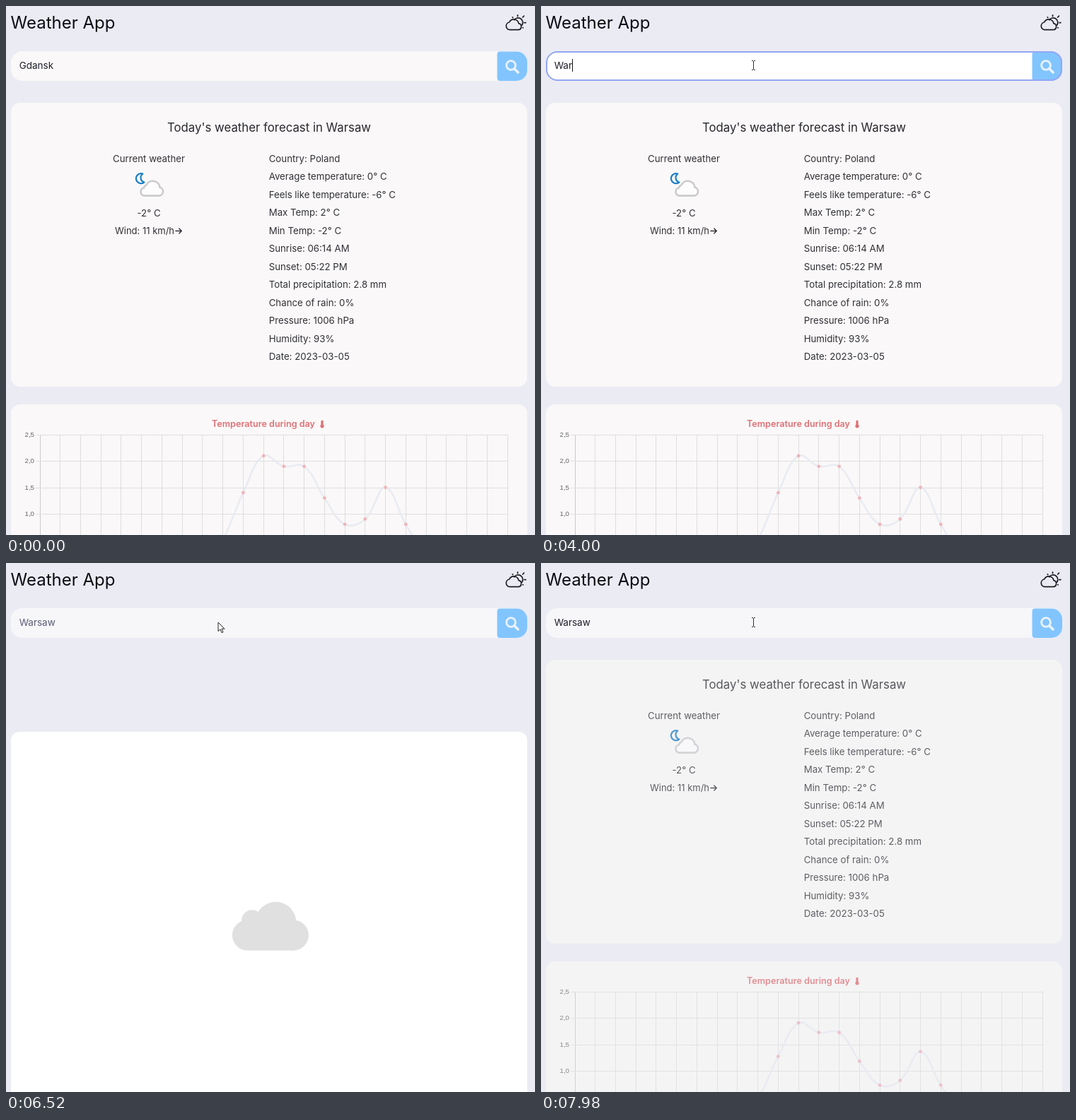
An HTML page for the animation above (8000 ms loop, 748x749 px).

```html
<!DOCTYPE html>
<html lang="en">
<head>
<meta charset="utf-8">
<title>Weather App</title>
<style>
  html, body { margin: 0; width: 100%; height: 100%; overflow: hidden; background: #ebebf4; }
  svg { display: block; width: 748px; height: 749px; font-family: Inter, "Open Sans", sans-serif; }
  .info { font-size: 13.25px; fill: #303036; }
  .axis { font: 9.7px "Liberation Sans", Arial, sans-serif; fill: #666; text-anchor: end; }
  .mid { text-anchor: middle; }
  .line { fill: none; stroke-linecap: round; stroke-linejoin: round; }
</style>
</head>
<body>
<svg viewBox="0 0 748 749">
  <rect width="748" height="749" fill="#ebebf4"/>
  <text x="6.5" y="32" font-size="24" fill="#0b0b10">Weather App</text>
  <g class="line" stroke="#1c1c20" stroke-width="1.7">
    <path d="M712.3 33.7h12a4.6 4.6 0 0 0 .6-9.1 7 7 0 0 0-13.2-1.6a5.4 5.4 0 0 0 .6 10.7z"/>
    <path d="M718.8 19.8a6.4 6.4 0 0 1 10.9 7.2"/>
    <path d="M723.5 12.8v1.8M716.2 15.9l.5.5M730.6 16l1.8-1.8M733 23.6h1.9M730.7 30.6l.4.4"/>
  </g>

  <rect id="field" x="7" y="64" width="730" height="42" rx="16"/>
  <path d="M698.5 64.5H722a15 15 0 0 1 15 15V91a15 15 0 0 1-15 15H698.5a4 4 0 0 1-4-4V68.5a4 4 0 0 1 4-4z" fill="#82c5fe"/>
  <rect id="ring" x="8" y="65" width="728" height="40" rx="15" fill="none" stroke="#93a5f6" stroke-width="2"/>
  <g class="line" stroke="#e9f2fb">
    <circle cx="714" cy="84" r="6.4" stroke-width="2.9"/>
    <path d="M719 89l5 5" stroke-width="3.6"/>
  </g>
  <text id="query" x="18.7" y="88.5" font-size="13.5"></text>
  <rect id="caret" y="75" width="1" height="18" fill="#111"/>

  <g id="content">
    <g id="cards">
      <rect x="7" y="137" width="730" height="402" rx="13"/>
      <rect x="7" y="564" width="730" height="230" rx="13"/>
    </g>
    <text class="mid" x="372" y="178" font-size="16.8" fill="#28282e">Today's weather forecast in Warsaw</text>
    <g class="info mid">
      <text x="202" y="221">Current weather</text>
      <text x="202" y="297.5">-2° C</text>
      <text x="196" y="323" font-size="13">Wind: 11 km/h</text>
    </g>
    <path class="line" d="M240 318.5h8.2M244.8 315l3.5 3.5-3.5 3.5" stroke="#303036" stroke-width="1.4"/>
    <path class="line" d="M193.3 237.6A7 7 0 1 0 195.4 249.6A6.8 6.8 0 0 1 193.3 237.6Z" stroke="#1c7fc6" stroke-width="2.2"/>
    <path d="M195.5 268.6H216.5A6 6 0 0 0 217.5 256.8A10 10 0 0 0 198.5 253.5A5 5 0 0 0 195 257.4A5.7 5.7 0 0 0 195.5 268.6Z" fill="#fdfdfd" stroke="#cbcbcd" stroke-width="2.6"/>
    <g id="facts" class="info"></g>

    <text x="291" y="595.5" font-size="12.6" font-weight="600" fill="#e07075">Temperature during day</text>
    <g fill="#e07075">
      <rect x="445.4" y="586.5" width="3.2" height="9" rx="1.6"/>
      <circle cx="447" cy="594.8" r="2.6"/>
    </g>
    <g id="grid"></g>
    <path id="curve" class="line" stroke="#e8ebf2" stroke-width="2.4"/>
    <g id="dots" fill="#eeb4bb"></g>
  </g>

  <g id="loader">
    <rect x="7" y="239" width="730" height="530" rx="12" fill="#fff"/>
    <g id="cloud" fill="#e0e0e0">
      <circle cx="341.5" cy="527" r="21.6"/>
      <circle cx="406.3" cy="527" r="21.6"/>
      <circle cx="381.5" cy="508.3" r="28.6"/>
      <circle cx="348" cy="506" r="14.8"/>
      <rect x="341.5" y="508" width="65" height="40.6"/>
    </g>
  </g>

  <g id="pointer">
    <path id="arrow" d="M0 0V12.6L3 9.9L5.1 14.7L7 13.9L5 9.2H9Z" fill="#fff" stroke="#222" stroke-width="1"/>
    <path id="beam" d="M-2-6.5H0M1-6.5H3M.5-6V6M-2 6.5H0M1 6.5H3" fill="none" stroke="#333"/>
  </g>
</svg>
<script>
const LOOP = 8000, SEND = 5400, LOADED = 7530;
const $ = id => document.getElementById(id);
const clamp = v => Math.min(1, Math.max(0, v));
const part = (t, a, b) => clamp((t - a) / (b - a));
const show = (id, on) => $(id).style.display = on ? "" : "none";

function add(parent, tag, attrs, text) {
  const el = document.createElementNS("http://www.w3.org/2000/svg", tag);
  for (const k in attrs) el.setAttribute(k, attrs[k]);
  if (text) el.textContent = text;
  return $(parent).appendChild(el);
}

function bezier(x1, y1, x2, y2) {
  const at = (a, b, s) => 3 * a * s * (1 - s) ** 2 + 3 * b * s * s * (1 - s) + s ** 3;
  return x => {
    let lo = 0, hi = 1;
    for (let i = 0; i < 24; i++) {
      const s = (lo + hi) / 2;
      if (at(x1, x2, s) < x) lo = s; else hi = s;
    }
    return at(y1, y2, lo);
  };
}
const ease = bezier(.25, .1, .25, 1), easeInOut = bezier(.42, 0, .58, 1);

["Country: Poland", "Average temperature: 0° C", "Feels like temperature: -6° C", "Max Temp: 2° C",
 "Min Temp: -2° C", "Sunrise: 06:14 AM", "Sunset: 05:22 PM", "Total precipitation: 2.8 mm",
 "Chance of rain: 0%", "Pressure: 1006 hPa", "Humidity: 93%", "Date: 2023-03-05"
].forEach((s, i) => add("facts", "text", { x: 371.7, y: 221 + 25.45 * i }, s));

// Chart: hourly temperatures, starting at hour 8
const FIRST = 8, ZERO = 793.6, UNIT = 74.6;
const temps = [-.1, .5, 1.4, 2.1, 1.9, 1.9, 1.3, .8, .9, 1.5, .8, .2, -.1];
const hourX = h => 48 + 28.74 * h;

for (let h = 0; h < 24; h++) {
  const x = Math.floor(hourX(h)) + .5;
  add("grid", "path", { d: `M${x} 607V749`, stroke: h ? "#dfdedf" : "#cbcacb" });
}
["2,5", "2,0", "1,5", "1,0"].forEach((s, i) => {
  const y = 607.5 + Math.round(37.3 * i);
  add("grid", "path", { d: `M42 ${y}H709`, stroke: "#dfdedf" });
  add("grid", "text", { x: 40, y: y + 2.7, class: "axis" }, s);
});
const dots = temps.map(() => add("dots", "circle", { r: 2.4 }));

function drawChart(k) {
  const p = temps.map((v, i) => [hourX(FIRST + i), ZERO - v * k * UNIT]);
  const ctrl = p.map((c, i) => {
    const a = p[i - 1] || c, b = p[i + 1] || c;
    const da = Math.hypot(c[0] - a[0], c[1] - a[1]), db = Math.hypot(b[0] - c[0], b[1] - c[1]);
    const side = f => [c[0] + f * (b[0] - a[0]), c[1] + f * (b[1] - a[1])];
    return [side(-.4 * da / (da + db)), side(.4 * db / (da + db))];
  });
  let d = "M" + p[0];
  for (let i = 1; i < p.length; i++) d += `C${ctrl[i - 1][1]} ${ctrl[i][0]} ${p[i]}`;
  $("curve").setAttribute("d", d);
  dots.forEach((c, i) => { c.setAttribute("cx", p[i][0]); c.setAttribute("cy", p[i][1]); });
}

// Typing: time, text, caret visible
const typing = [
  [0, "Gdansk", 0], [1080, "Gdansk", 1], [1600, "Gdansk", 0],
  [2000, "Gdans", 1], [2130, "Gdan", 1], [2260, "Gda", 1], [2390, "Gd", 1],
  [2590, "G", 1], [2660, "G", 0], [2730, "", 1], [3190, "", 0],
  [3470, "W", 1], [3730, "Wa", 1], [4000, "War", 1], [4270, "Wars", 1],
  [4540, "Warsa", 1], [4740, "Warsaw", 1], [5270, "Warsaw", 0]
];

// Each half turn of the loader: start and end
const turns = [[5840, 5990], [6050, 6510], [6680, 7100], [7170, 7525]];

const mix = (a, b, k) => `rgb(${a.map((v, i) => Math.round(v + (b[i] - v) * k))})`;

function drawInput(t) {
  const [, text, caret] = typing.findLast(s => s[0] <= t);
  const query = $("query");
  query.textContent = text;
  query.setAttribute("fill", t >= SEND && t < LOADED ? "#5a5b75" : "#1e1e2a");
  show("caret", caret);
  $("caret").setAttribute("x", 19 + Math.round(text ? query.getComputedTextLength() : 0));

  const focus = part(t, 1020, 1210), blur = part(t, SEND, 5540);
  $("ring").setAttribute("opacity", focus * (1 - blur));
  $("field").setAttribute("fill", t < SEND
    ? mix([250, 248, 248], [255, 255, 255], focus)
    : mix([255, 255, 255], [247, 247, 250], blur));
}

function drawPointer(t) {
  const k = easeInOut(part(t, 150, 820));
  const x = 659 + (300 - 659) * k, y = 681 + (84 - 681) * k;
  const beam = y < 106 && !(t >= SEND && t < 7420);
  show("pointer", t >= 190);
  show("arrow", !beam);
  show("beam", beam);
  $("pointer").setAttribute("transform", `translate(${x} ${y})`);
}

function draw(t) {
  drawInput(t);
  drawPointer(t);
  const loading = t >= SEND && t < LOADED;
  show("loader", loading);
  show("content", !loading);
  const angle = turns.reduce((sum, [a, b]) => sum + 180 * easeInOut(part(t, a, b)), 0);
  $("cloud").setAttribute("transform", `rotate(${angle} 372.5 516.5)`);

  const age = t < SEND ? 1 : part(t, LOADED, LOADED + 1000);
  $("content").setAttribute("opacity", age < 1 ? ease(age) : 1);
  $("cards").setAttribute("fill", age < 1 ? "#f7f7f4" : "#faf8f8");
  drawChart(1 - (1 - age) ** 4);
}

const start = performance.now();
function tick() {
  draw((performance.now() - start) % LOOP);
  requestAnimationFrame(tick);
}
tick();
</script>
</body>
</html>
```
